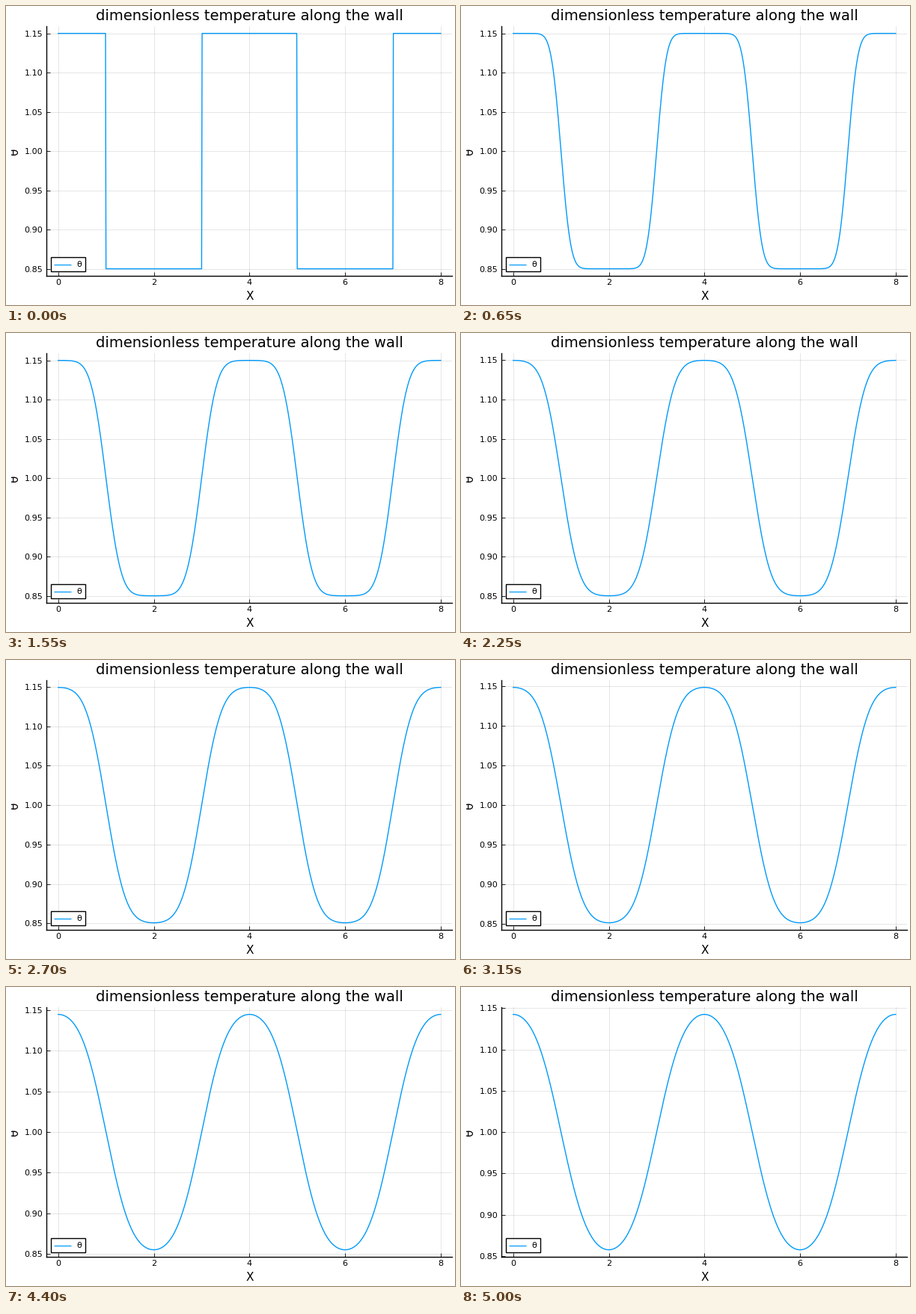
Recreate the animation shown at these times as a matplotlib script. Size 600 px wide and 400 px high, loop 5050 ms.

```python
import numpy as np
import matplotlib.pyplot as plt
from matplotlib.animation import FuncAnimation
from matplotlib.patches import Rectangle

plt.rcParams["font.family"] = "DejaVu Sans"

W, H, DPI = 600, 400, 100
LEFT, RIGHT, TOP, BOTTOM = 54.4, 596.2, 27.2, 361.0
FRAMES, STEP_MS = 101, 50
DT = 0.001          # diffusion time per frame
AMP = 0.15
MARGIN = 0.03
BLUE = "#009afa"

x = np.linspace(0, 8, 801)
odd = np.arange(1, 260, 2)
waves = np.cos(np.outer(x, odd) * np.pi / 2)
coef = 4 / np.pi * np.where(odd % 4 == 1, 1, -1) / odd


def theta(frame):
    """Square wave smoothed by the heat equation."""
    if frame == 0:
        phase = np.arange(x.size) % 400
        return np.where((phase < 100) | (phase > 300), 1 + AMP, 1 - AMP)
    decay = np.exp(-(odd * np.pi / 2) ** 2 * DT * frame)
    return 1 + AMP * waves @ (coef * decay)


fig = plt.figure(figsize=(W / DPI, H / DPI), dpi=DPI, facecolor="white")

ax = fig.add_axes([LEFT / W, 1 - BOTTOM / H, (RIGHT - LEFT) / W, (BOTTOM - TOP) / H])
ax.patch.set_visible(False)
ax.set_xlim(-8 * MARGIN, 8 + 8 * MARGIN)
ax.set_xticks(range(0, 9, 2))
ax.set_yticks(np.arange(0.85, 1.151, 0.05))
ax.yaxis.set_major_formatter("{x:.2f}")
ax.set_axisbelow(True)
ax.grid(color="black", alpha=0.1, linewidth=0.7)
ax.tick_params(direction="in", length=3.6, width=0.6, labelsize=8)
ax.tick_params(axis="x", pad=3.2)
ax.tick_params(axis="y", pad=3.9)
for side in ("top", "right"):
    ax.spines[side].set_visible(False)
for side in ("left", "bottom"):
    ax.spines[side].set_linewidth(1)
curve, = ax.plot(x, theta(0), color=BLUE, linewidth=1)

# Overlay measured in pixels from the top left corner
page = fig.add_axes([0, 0, 1, 1], zorder=2)
page.set_xlim(0, W)
page.set_ylim(H, 0)
page.axis("off")


def label(px, py, text, size, **kw):
    page.text(px, py, text, fontsize=size, ha="center", va="baseline", **kw)


mid = (LEFT + RIGHT) / 2
label(mid, 19.3, "dimensionless temperature along the wall", 14)
label(mid, 393.3, "X", 11)
label(16.2, 195.8, "θ", 11, rotation=90, rotation_mode="anchor")
page.add_patch(Rectangle((0, 180), 7, 30, color="white", linewidth=0, zorder=4))

page.add_patch(Rectangle((60, 336), 46, 19, facecolor="white", edgecolor="black", linewidth=1))
page.plot([64.3, 87], [345.5, 345.5], color=BLUE, linewidth=0.9, solid_capstyle="butt")
label(98.2, 349.4, "θ", 8)


def update(frame):
    y = theta(frame)
    low, high = y.min(), y.max()
    pad = MARGIN * (high - low)
    curve.set_ydata(y)
    ax.set_ylim(low - pad, high + pad)
    return curve,


anim = FuncAnimation(fig, update, frames=FRAMES, interval=STEP_MS,
                     repeat=True, repeat_delay=0, blit=False)
plt.show()
```
